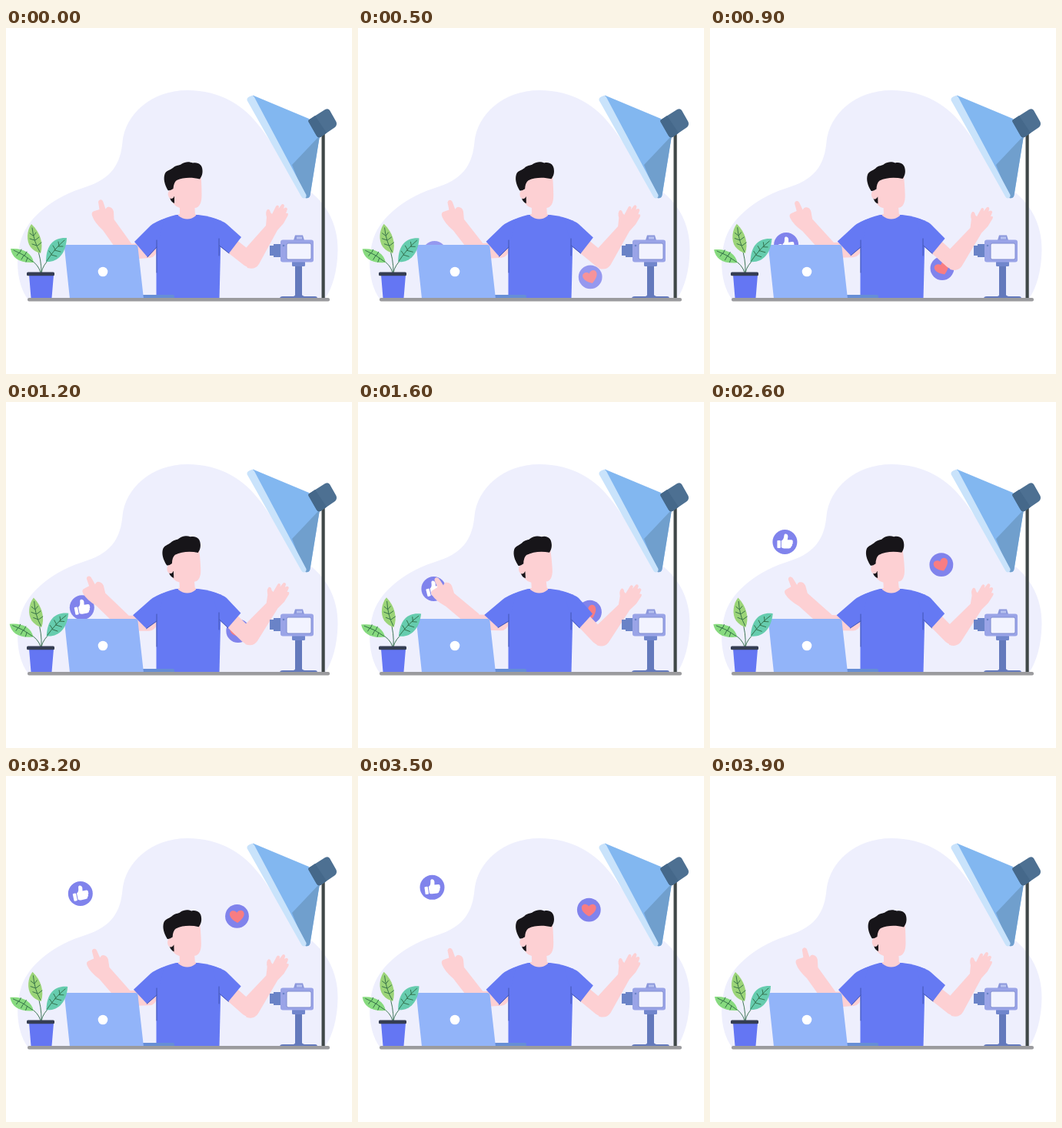
Animation of 450x450 px, one loop 4 s. Source, as an HTML page:

```html
<!DOCTYPE html>
<html lang="en">
<head>
<meta charset="utf-8">
<title>Video creator</title>
<style>
html, body { margin: 0; width: 100%; height: 100%; overflow: hidden; background: #fff; }
svg { display: block; width: 100vw; height: 100vh; }
.skin { fill: #fdd0d3; }
.limb { fill: none; stroke: #fdd0d3; stroke-linecap: round; stroke-linejoin: round; }
.shirt { fill: #6579f3; }
.seam { fill: none; stroke: #4356b4; stroke-width: 1; stroke-linecap: round; }
.vein { fill: none; stroke: #2f6a45; stroke-width: .9; stroke-linecap: round; }
</style>
</head>
<body>
<svg viewBox="0 0 450 450">
  <path fill="#eeeffd" d="M28 352C15 334 11 302 20 274C30 244 64 219 103 207C138 196 149 176 151.500 148C155 113 188 81 236 81C279 81 309 101 329 127C351 155 370 194 397 214C421 233 432 261 431.500 289C431 316 425 337 415 352Z"/>

  <g id="like">
    <circle r="16" fill="#8083ec"/>
    <g id="thumb" fill="#fff">
      <rect x="-10" y="-2" width="4.400" height="10" rx="1"/>
      <path d="M-4.600 -1.500C-1.200 -3-1.400-6.500-.8 -9.200C-.2 -11.400 4-10.800 4-7L3.400 -2.800H8.400Q11-2.400 10.200 .2Q11 1.800 9.500 3.200Q9.800 5.400 8.300 6Q8 8.400 5.500 8.400H-1.200Q-3.400 8.200-4.600 7Z"/>
    </g>
  </g>
  <g id="love">
    <circle r="15.400" fill="#8083ec"/>
    <path id="heart" fill="#f87d82" d="M0 8.500C-5 5.500-9.400 1.500-9.400-2.800C-9.400-8-2.800-9 0-4.600C2.800-9 9.400-8 9.400-2.800C9.400 1.500 5 5.500 0 8.500Z"/>
  </g>

  <!-- light and stand -->
  <rect x="410.500" y="136" width="4.200" height="216" fill="#3f4747"/>
  <path fill="#82b7f0" d="M321 87.500L394 118L408 140L395.500 218Q394 222 390 221L320 92Z"/>
  <path fill="#709fcd" d="M408 140L372 178L389 221Q394.500 222.500 395.500 217Z"/>
  <path fill="#c9e3fb" d="M313.500 94Q313 90.500 317 89L319.500 88Q321.500 87.500 323 90L390.500 217Q391 221 388 221.500Q385.500 222 384 219Z"/>
  <path fill="#4d7092" d="M394.500 119L415 106Q419 104 421 107L429.500 122Q431 126 428 129L409 142Q405 143 403.500 139.500L393.500 122Q392.500 120 394.500 119Z"/>
  <path fill="#45688a" d="M394.500 119L402 114L417 136.500L409 142Q405 143 403.500 139.500L393.500 122Q392.500 120 394.500 119Z"/>

  <!-- arms -->
  <g class="limb" stroke-width="20">
    <path id="upperL"/>
    <path id="upperR"/>
  </g>
  <g id="foreL">
    <path class="skin" d="M120 226Q121 222.500 124.200 223.500Q126 224 127 228L129.500 235.500Q132 231.500 135 233Q139 234 140 239L140.500 249L165 283L162 301Q151 297 143 287L126 263Q115 253 112 244Q110.500 239 115 238L121.500 236Z"/>
  </g>
  <g id="foreR">
    <path class="skin" d="M338 257L339 246Q337 239 340 236Q343 235 344 240L346 242L351 232Q353 229 355 232L354.500 235L358.500 229.500Q361 228 362 231L361 235Q365 232 366 235.500L364 241Q368 240 366.500 244L361 254L353 263L329 307Q324 315 314 312L305 294Z"/>
  </g>

  <!-- body -->
  <path class="shirt" d="M195.500 352V253Q206 246.500 221 243H250Q268 245 280 251L277.500 352Z"/>
  <path id="sleeveL" class="shirt"/>
  <path id="sleeveR" class="shirt"/>
  <path id="hemL" class="seam"/>
  <path id="hemR" class="seam"/>
  <path class="seam" d="M196 276V318M277 274V296"/>
  <g id="head">
    <path class="skin" d="M216 208C216 195 223 189 236 189H253Q254.500 200 254.500 218C254.500 228 251 234 245.500 234L246 244Q237 252 226 244L226 234Q216 231 215 220Z"/>
    <path fill="#171519" d="M213 220L219 219V228Q214 226 213 220Z"/>
    <ellipse class="skin" cx="215" cy="216" rx="4.300" ry="6"/>
    <path fill="#171519" d="M217.500 209Q213 212 210.500 211C206 203 204.500 196 206.500 190C208 185.500 213 185 217 182C221 178 226 179 228 177C234 173 239 174 243 175.500C250 174 255.500 178 255.500 185C256 190 254 194 252 196.500C242 194 231 194 222 198Q218 201 217.500 209Z"/>
  </g>
  <path class="skin" d="M224 242H247V244Q236 253 224 244Z"/>

  <!-- laptop -->
  <path fill="#668ed6" d="M174 347H217Q219 347 219 349V352H174Z"/>
  <path fill="#92b4f9" d="M79 282H168Q171 282 171.500 285L179 352H83L76 286Q75.500 282 79 282Z"/>
  <circle cx="126" cy="317" r="6.300" fill="#fff"/>

  <!-- camera -->
  <g>
    <path fill="#6379bc" d="M376 307H385V347Q386 349 390 349H402Q405 349 405 352H356Q356 349 360 349H372Q376 349 376 347Z"/>
    <rect x="372" y="303" width="17" height="7" rx="1.500" fill="#7186cc"/>
    <path fill="#6a83c7" d="M343 283H348V281H358V298H348V296H343Z"/>
    <path fill="#8c98dc" d="M374 276L376 269.500H386L388 276Z"/>
    <rect x="378" y="271.500" width="7" height="3" fill="#b7c1f0"/>
    <rect x="357" y="275.500" width="43" height="29" rx="3" fill="#9aa4e7"/>
    <rect x="365" y="280" width="32" height="21" rx="2" fill="#f2f3ff" stroke="#7f8cd0"/>
    <circle cx="361" cy="283" r="1.300" fill="#6a83c7"/>
  </g>

  <!-- plant -->
  <g id="leafM">
    <path class="vein" d="M46 318Q46 300 40 285"/>
    <path fill="#9bd478" d="M33 255C27 263 26 277 32 285Q37 291 45 293C49 281 45 266 33 255Z"/>
    <path class="vein" d="M34 260Q36 278 44 291M35 270L31 267M37 276L31 274M40 283L34 281M36 270L39 266M38 276L43 272M41 283L46 279"/>
  </g>
  <g id="leafL">
    <path class="vein" d="M45 318Q42 307 31 301"/>
    <path fill="#87da7f" d="M6 287C8 299 17 306 36 305C34 293 23 286 6 287Z"/>
    <path class="vein" d="M10 289Q23 294 35 304M18 292L20 288M24 296L27 291M17 292L14 296M23 296L20 301M28 299L26 304"/>
  </g>
  <g id="leafR">
    <path class="vein" d="M46 318Q48 308 57 300"/>
    <path fill="#66ccae" d="M79 273C63 272 52 281 52 304C67 305 78 294 79 273Z"/>
    <path class="vein" d="M76 276Q64 286 53 303M69 283L68 278M64 288L61 283M59 294L56 290M68 284L74 284M63 289L71 291M59 295L66 297"/>
  </g>
  <path fill="#6476f3" d="M30 321H62L59.500 351H32.500Z"/>
  <rect x="27" y="317.500" width="36" height="4.800" rx="1.500" fill="#353d53"/>

  <rect x="28" y="351" width="393" height="4.600" rx="2" fill="#9b9b9e"/>
</svg>
<script>
const LOOP = 4000, STEP = 100;
const el = id => document.getElementById(id);
const set = (id, name, value) => el(id).setAttribute(name, value);
const clamp = v => Math.max(0, Math.min(1, v));

const times = [0, 900, 1600, 2100, 2600, 3200, 3900, 4000];
const rise = [303, 282, 243, 212, 182, 153, 137, 136];
const thumbTilt = [0, -8, -14, -10, 0, -12, 0, 0];
const heartTilt = [-12, -22, -28, -28, -22, -4, 0, 0];

// Smooth curve through key values
function along(keys, t) {
  let i = 0;
  while (i < times.length - 2 && t >= times[i + 1]) i++;
  const slope = k => {
    const a = Math.max(0, k - 1), b = Math.min(times.length - 1, k + 1);
    return (keys[b] - keys[a]) / (times[b] - times[a]);
  };
  const d = times[i + 1] - times[i], u = (t - times[i]) / d;
  const u2 = u * u, u3 = u2 * u;
  return (2 * u3 - 3 * u2 + 1) * keys[i] + (3 * u2 - 2 * u3) * keys[i + 1]
    + d * ((u3 - 2 * u2 + u) * slope(i) + (u3 - u2) * slope(i + 1));
}

function turn(id, angle, x, y, dx = 0, dy = 0) {
  set(id, "transform", `translate(${dx} ${dy}) rotate(${angle} ${x} ${y})`);
}

function drawSleeves(s) {
  const tipL = `${167 - 3 * s} ${278 - s}`, endL = `${184 - 2 * s} ${298 - 5 * s}`;
  const tipR = `${306 - s} ${272 + 4 * s}`, endR = `${290 - 2 * s} ${293 + s}`;
  set("sleeveL", "d", `M206 248Q194 252 188 257L${tipL}L${endL}L196.5 285Z`);
  set("sleeveR", "d", `M268 247Q281 250 287 255L${tipR}L${endR}L277 283Z`);
  set("hemL", "d", `M${endL}L196 285`);
  set("hemR", "d", `M${endR}L277.5 283`);
}

function draw(t) {
  const s = (1 - Math.cos(2 * Math.PI * t / LOOP)) / 2;

  turn("foreL", -16 * s, 160, 288, -7 * s, -7 * s);
  turn("foreR", 5 * s, 316, 304, -3 * s, 5 * s);
  set("upperL", "d", `M${160 - 4 * s} ${291 - 5 * s}L186 ${289 - 2 * s}`);
  set("upperR", "d", `M${316 - 3 * s} ${301 + 5 * s}L288 279`);
  drawSleeves(s);
  turn("head", -4 * s, 238, 245);

  turn("leafM", 4 * s, 46, 318);
  turn("leafL", -4 * s, 45, 318);
  turn("leafR", 4.5 * s, 46, 318);

  const y = along(rise, t), p = t / LOOP;
  const alpha = clamp((t - 100) / 500) * clamp((3900 - t) / 400);
  set("like", "transform", `translate(${100 - 4 * p} ${y})`);
  set("love", "transform", `translate(${302.5 - 2.5 * p} ${y + 29 + 2 * (1 - p)})`);
  set("like", "opacity", alpha);
  set("love", "opacity", alpha);
  turn("thumb", along(thumbTilt, t), 0, 0);
  turn("heart", along(heartTilt, t), 0, 0);
}

const start = performance.now();
function tick() {
  const t = (performance.now() - start) % LOOP;
  draw(Math.floor(t / STEP) * STEP);
  requestAnimationFrame(tick);
}
tick();
</script>
</body>
</html>
```
